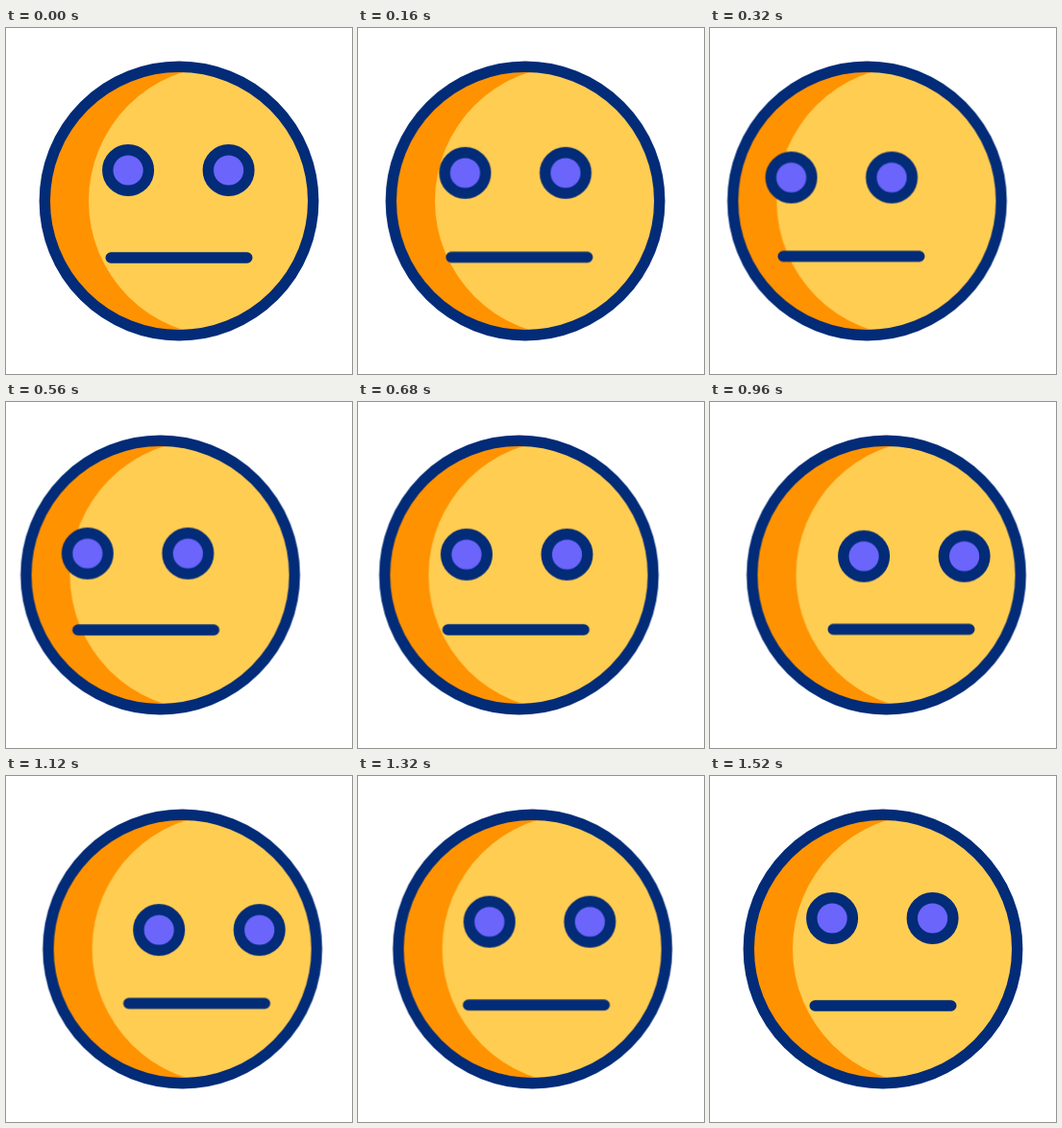
These frames come from a looping animation (360x360 px, 2000 ms). An HTML page:

```html
<!DOCTYPE html>
<html lang="en">
<head>
<meta charset="utf-8">
<title>Looking around</title>
<style>
  html, body { margin: 0; width: 100%; height: 100%; overflow: hidden; background: #fff; }
  svg { display: block; width: 100%; height: 100%; }
  .line { stroke: #022b78; stroke-width: 11.4; stroke-linecap: round; }
  .eye { fill: #6b65fb; }
</style>
</head>
<body>
<svg viewBox="0 0 360 360">
  <clipPath id="disc"><circle cx="180" cy="180" r="139"/></clipPath>
  <g id="head">
    <circle cx="180" cy="180" r="139" fill="#ff9200"/>
    <circle cx="226.6" cy="180" r="140.6" fill="#ffcd52" clip-path="url(#disc)"/>
    <circle class="line" cx="180" cy="180" r="139.7" fill="none"/>
  </g>
  <path id="mouth" class="line" d="M109.2 239H250.8"/>
  <g id="eyes">
    <ellipse class="line eye" cx="127.1" cy="148" rx="21.3" ry="21.3"/>
    <ellipse class="line eye" cx="231.6" cy="148" rx="21.3" ry="21.3"/>
  </g>
</svg>
<script>
const LOOP = 2000, STEP = 40;
const SMOOTH = 'cubic-bezier(.333, 0, .667, 1)';
const SETTLE = 'cubic-bezier(.33, 0, .45, 1)';
const $ = id => document.getElementById(id);

function track(element, frames) {
  const animation = element.animate(
    frames.map(([time, style, easing = SMOOTH]) => ({ offset: time / LOOP, easing, ...style })),
    { duration: LOOP, iterations: Infinity });
  animation.pause();
  return animation;
}

const at = (x, y) => ({ transform: `translate(${x}px, ${y}px)` });

// Rest, glance left, sweep right, then return to rest.
function glance(id, left, right, [arrive, leave, end], easing = SETTLE) {
  const rest = at(0, 0);
  return track($(id), [
    [0, rest], [arrive, at(...left)], [leave, at(...left)],
    [end, at(...right)], [1080, at(...right), easing],
    [1520, rest], [LOOP, rest]
  ]);
}

const open = { ry: '21.3px', transform: 'translateY(0px)' };
const squint = { ry: '10.8px', transform: 'translateY(1px)' };
const blink = eye => track(eye, [
  [0, open], [690, open], [825, squint], [960, open], [LOOP, open]
]);

const tracks = [
  glance('head', [-21.3, 0], [3.7, 0], [460, 475, 990], SMOOTH),
  glance('mouth', [-40.4, -1.8], [19, -2.5], [440, 465, 950]),
  glance('eyes', [-52, 9.2], [33, 12.5], [440, 460, 935]),
  ...[...document.querySelectorAll('.eye')].map(blink)
];

const start = performance.now();
function draw() {
  const time = (performance.now() - start + 4) % LOOP;
  const stepped = Math.floor(time / STEP) * STEP;
  for (const animation of tracks) animation.currentTime = stepped;
  requestAnimationFrame(draw);
}
draw();
</script>
</body>
</html>
```
